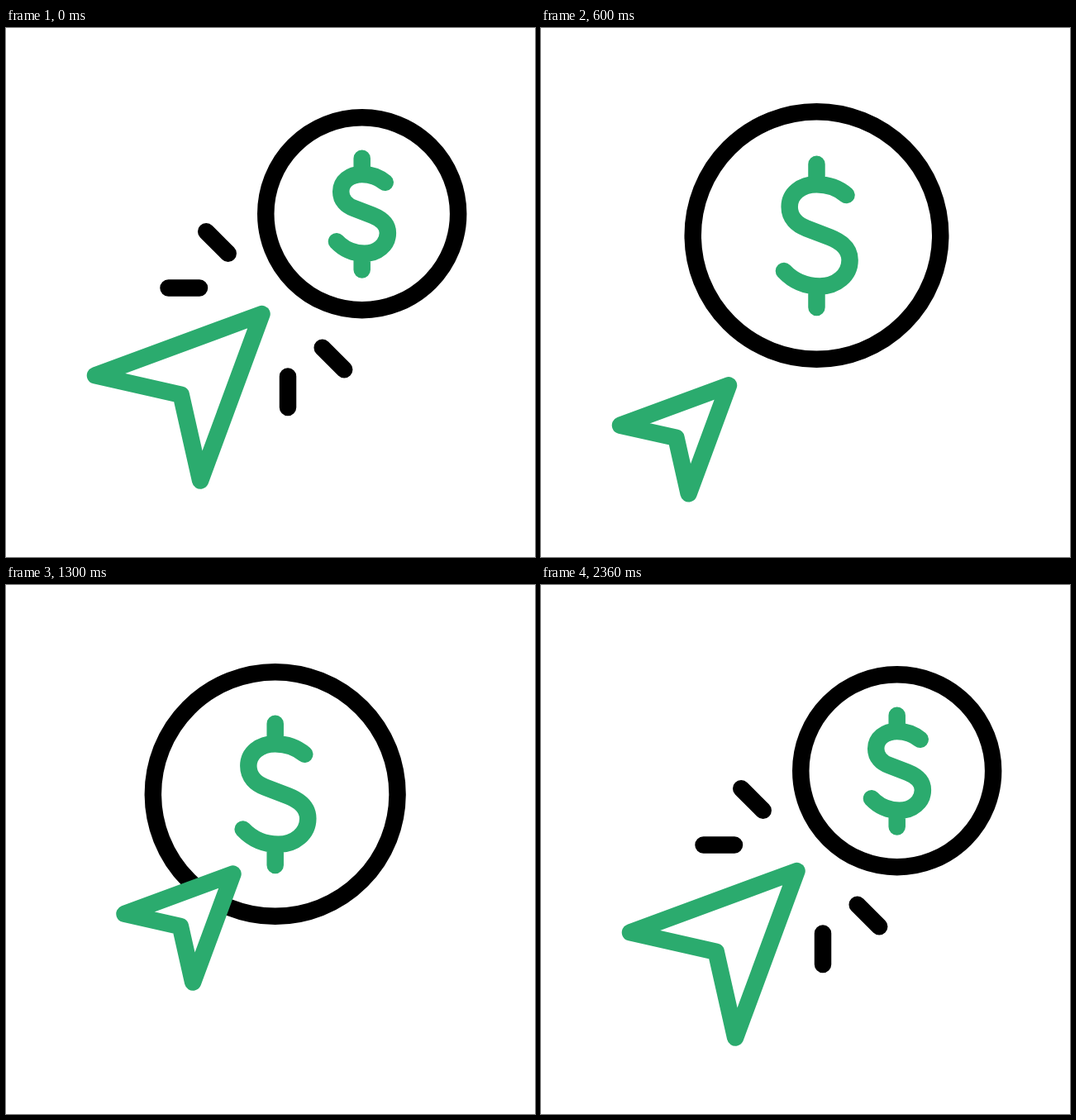
Write an HTML page that moves like this. It is 640 px wide and 640 px high and loops after 2400 ms.

```html
<!DOCTYPE html>
<html lang="en">
<head>
<meta charset="utf-8">
<title>Click to pay</title>
<style>
  html, body { margin: 0; width: 100%; height: 100%; overflow: hidden; background: #fff; }
  svg { display: block; width: 100%; height: 100%; }
  svg * { stroke-linecap: round; stroke-linejoin: round; }
  .ink { fill: none; stroke: #000; }
  .green { fill: none; stroke: #2bab6e; }
  #cursor { fill: #fff; }
</style>
</head>
<body>
<svg viewBox="0 0 640 640">
  <path id="rays" class="ink" stroke-width="20.5"/>
  <g id="coin">
    <circle class="ink" r="158"/>
    <path class="green" d="M38-51.5C28-60 14-65 0-65C-20-65-34.6-53-34.6-36.5C-34.6-22-25-13.5-13-9L17 2.5C32 8.5 42.3 17 42.3 31.5C42.3 51 25 65 4 65C-14 65-30 58-41.7 45.5M0-91V-65M0 65V92"/>
  </g>
  <path id="cursor" class="green"/>
</svg>
<script>
const LOOP = 2400, TICK = 20, STROKE = 20.5;
const [coin, cursor, rays] = ['coin', 'cursor', 'rays'].map(id => document.getElementById(id));

// A point on the stage, or an offset between two points.
const P = (x, y) => ({ x, y });
const mix = (a, b, k) => P(a.x + (b.x - a.x) * k, a.y + (b.y - a.y) * k);
const add = (a, dx, dy) => P(a.x + dx, a.y + dy);
const poly = points => 'M' + points.map(p => `${p.x} ${p.y}`).join('L');

// Cursor and rays are symmetric about the diagonal through the cursor.
const home = P(208.75, 446.75);
const mirror = (p, sum = home.x + home.y) => P(sum - p.y, sum - p.x);

const wing = P(-100.75, -26.4);
cursor.setAttribute('d', poly([P(100.75, -100.75), wing, P(3, -3), mirror(wing, 0)]) + 'Z');

// Each ray runs from its inner end to its outer end.
const flat = P(234, 314.5), slanted = P(268.7, 272.8);
const half = [[flat, add(flat, -37.5, 0)], [slanted, add(slanted, -26.5, -26.5)]];
const rayEnds = half.concat(half.map(ray => ray.map(p => mirror(p))));

const coinHome = P(430.7, 224.8), coinFront = P(325.7, 253), COIN_SMALL = .737;
const windup = P(161.5, 497.8), target = P(209, 415);

// Scale the shape while its outline keeps the same weight.
function place(el, { x, y }, scale) {
  el.setAttribute('transform', `translate(${x} ${y}) scale(${scale})`);
  el.setAttribute('stroke-width', STROKE / scale);
}

function draw(now) {
  const tick = (now % LOOP) / TICK;
  const ramp = (from, to) => {
    const t = Math.min(1, Math.max(0, (tick - from) / (to - from)));
    return t * t * (3 - 2 * t);
  };
  const press = (from, to) => {
    const mid = (from + to) / 2;
    return ramp(from, mid) - ramp(mid, to);
  };
  const back = ramp(85, 118), resize = ramp(90, 118);

  const grown = ramp(5, 40) - resize;
  place(coin, mix(coinHome, coinFront, ramp(5, 35) - back),
    COIN_SMALL + (1 - COIN_SMALL) * grown - .082 * press(52, 72));

  const strike = mix(mix(home, windup, ramp(5, 30)), target, ramp(30, 50));
  place(cursor, mix(strike, home, back),
    1 - .35 * (ramp(5, 30) - resize) - .08 * press(50, 60));

  const reach = 1 - ramp(5, 15) + ramp(108, 118);
  rays.setAttribute('d', reach > .001
    ? rayEnds.map(([a, b]) => poly([a, mix(a, b, reach)])).join('')
    : '');
}

let start;
function loop(now) {
  start ??= now;
  draw(Math.max(0, now - start));
  requestAnimationFrame(loop);
}
draw(0);
requestAnimationFrame(loop);
</script>
</body>
</html>
```
